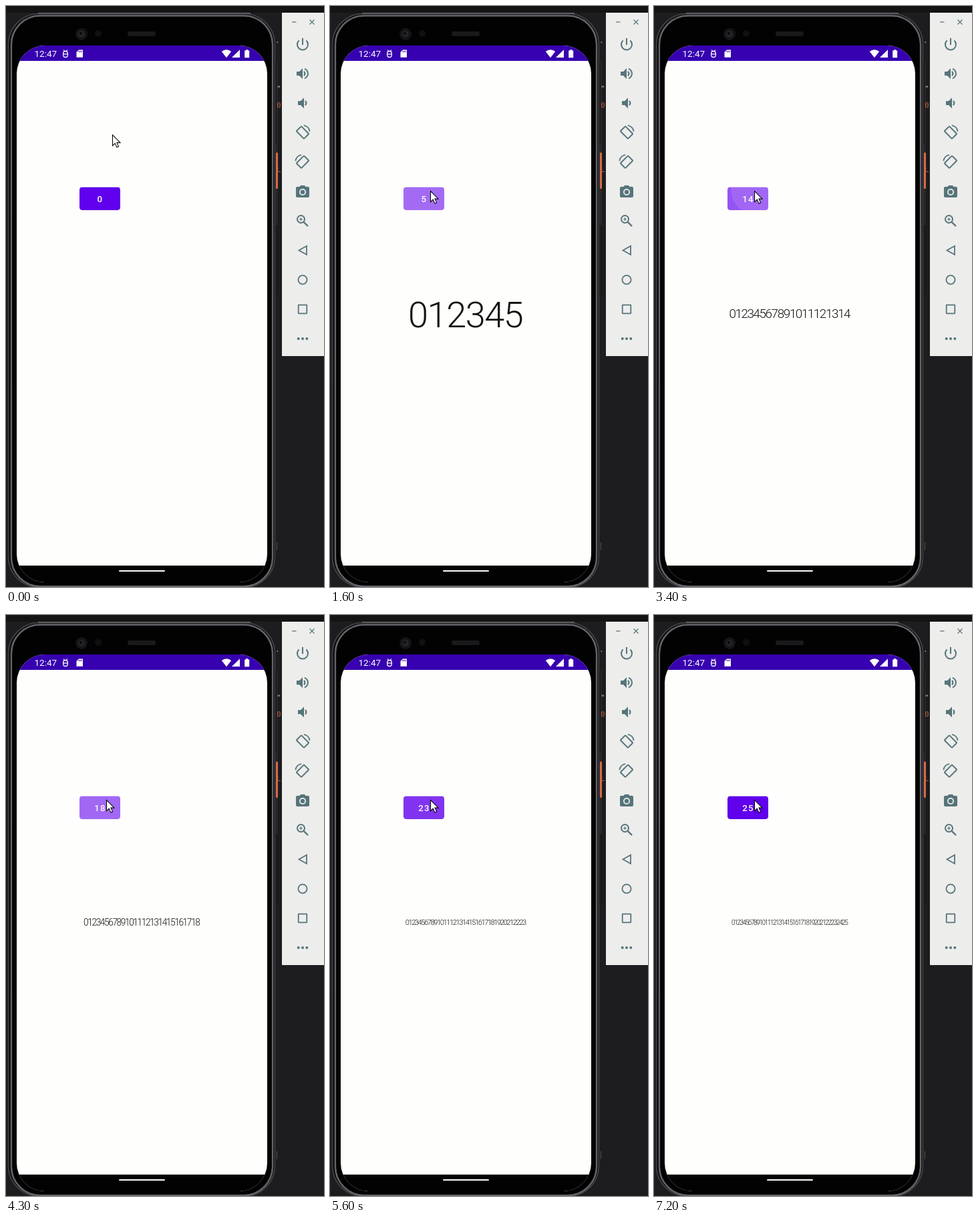
Recreate the animation shown at these times as an HTML page with a canvas. Size 476 by 868 pixels, loop 7.3 s.

```html
<!DOCTYPE html>
<html lang="en">
<head>
<meta charset="utf-8">
<title>Counter with shrinking text</title>
<style>
  html, body { margin: 0; width: 100%; height: 100%; overflow: hidden; background: #1d1d1f; }
  canvas { display: block; width: 476px; height: 868px; }
</style>
</head>
<body>
<canvas id="stage" width="476" height="868"></canvas>
<script>
const ctx = document.getElementById('stage').getContext('2d');
const LOOP = 7300, STEP = 100;
const DP = 375 / 393;                 // stage pixels per density-independent pixel
const WHITE = '#fefefc', PANEL = '#ededec', ICON = '#56757a', BAR = '#3700b0';
const TIP_START = [159, 192], TIP_END = [150, 276];

// Pace of the clicks: [count, time]
const PACE = [[1, 700], [5, 1530], [10, 2560], [14, 3360], [18, 4230], [23, 5250], [25, 6000]];
const clicks = [];
for (let n = 1; n <= 25; n++) {
  const i = Math.max(1, PACE.findIndex(p => p[0] >= n));
  const [n0, t0] = PACE[i - 1], [n1, t1] = PACE[i];
  clicks.push(t0 + (t1 - t0) * (n - n0) / (n1 - n0));
}

const clamp = v => Math.min(1, Math.max(0, v));
const ease = v => v * v * (3 - 2 * v);

function rect(x, y, w, h, color, r = 0) {
  ctx.fillStyle = color;
  ctx.beginPath();
  ctx.roundRect(x, y, w, h, r);
  ctx.fill();
}
function outline(x, y, w, h, r, color, width) {
  ctx.strokeStyle = color;
  ctx.lineWidth = width;
  ctx.beginPath();
  ctx.roundRect(x, y, w, h, r);
  ctx.stroke();
}
function disc(x, y, r, color) {
  ctx.fillStyle = color;
  ctx.beginPath();
  ctx.arc(x, y, r, 0, 7);
  ctx.fill();
}
function arc(x, y, r, from, to, width = 2) {
  ctx.lineWidth = width;
  ctx.beginPath();
  ctx.arc(x, y, r, from * Math.PI / 180, to * Math.PI / 180);
  ctx.stroke();
}
function fillPath(d, color) {
  ctx.fillStyle = color;
  ctx.fill(new Path2D(d));
}
function strokePath(d, width = 2) {
  ctx.lineWidth = width;
  ctx.stroke(new Path2D(d));
}
function text(str, x, y, font, color, spacing = 0) {
  ctx.font = font;
  ctx.letterSpacing = spacing + 'px';
  ctx.fillStyle = color;
  ctx.fillText(str, x, y);
}
function centered(str, x, y, font, color, spacing) {
  ctx.font = font;
  ctx.letterSpacing = spacing + 'px';
  text(str, x - ctx.measureText(str).width / 2, y, font, color, spacing);
}

function drawBackdrop() {
  rect(0, 0, 476, 868, '#1d1d1f');
  rect(0, 0, 476, 10, '#141415');
  const mono = '11px "DejaVu Sans Mono", monospace';
  text('.', 403, 55, mono, '#b8b8b8');
  text('"', 405, 127, mono, '#b8b8b8');
  text('0', 405, 152, mono, '#c0603c');
  text('L', 405, 248, mono, '#c0603c');
}

function drawPhone() {
  rect(403, 82, 3, 124, '#0a0a0b');
  rect(403, 328, 4, 105, '#0a0a0b');
  rect(405, 82, 1, 245, '#38383a');
  rect(405, 328, 1, 105, '#323234');
  rect(405, 801, 1, 12, '#505052');
  rect(404, 219, 3, 54, '#d86a4a', 1);

  rect(2, 10, 402, 860, '#0a0a0b', 48);
  outline(3.5, 11.5, 399, 857, 46, '#414145', 2);
  outline(8, 14.5, 391, 852.5, 43, '#64646a', 2.5);
  rect(9.5, 16, 388, 849.5, '#020203', 42);
  rect(48, 10, 318, 1.5, '#68686c');

  disc(113, 42, 9, '#151518');
  disc(113, 42, 5, '#242428');
  disc(112, 41, 2, '#0a0a0b');
  disc(138, 41, 5, '#101012');
  rect(182, 38, 42, 7, '#19191c', 3);
}

function drawStatusBar() {
  rect(16, 59, 375, 23, BAR);
  text('12:47', 42.5, 76, '13.5px Roboto, sans-serif', WHITE);

  outline(85.7, 67.5, 6.6, 9, 3.3, WHITE, 1.3);
  strokePath('M86 71.8h6M86.2 65.5l1.4 2M91.8 65.5l-1.4 2', 1.2);

  fillPath('M109 65.5h6v11.3h-9.5v-7.8z', WHITE);
  for (const x of [108.6, 110.6, 112.6]) rect(x, 67, 1, 2.2, BAR);

  fillPath('M330 77.3L322.8 68Q330 62.4 337.2 68z', WHITE);
  fillPath('M350 65.2v11.8h-12z', WHITE);
  fillPath('M357.2 66.5h2v-1.3h3v1.3h2v10.7h-7z', WHITE);
}

function drawButton(count, t) {
  ctx.save();
  ctx.beginPath();
  ctx.roundRect(110, 270.5, 61, 34.5, 4);
  ctx.clip();
  ctx.fillStyle = '#6000ec';
  ctx.fill();
  for (const start of clicks) {
    const age = t - start;
    if (age < 0 || age > 500) continue;
    const alpha = 0.27 * clamp(age / 100) * clamp((500 - age) / 200);
    const radius = 24 + 40 * ease(clamp(age / 120));
    disc(...TIP_END, radius, `rgba(255,255,255,${alpha})`);
  }
  ctx.restore();
  centered(String(count), 141, 293, `500 ${14 * DP}px Roboto, sans-serif`, WHITE, 1.25 * DP);
}

// The font shrinks by a tenth until the line fits half the screen.
function drawDigits(count) {
  if (!count) return;
  let str = '';
  for (let n = 0; n <= count; n++) str += n;
  const spacing = -1.5 * DP;
  const font = size => `300 ${size}px Roboto, sans-serif`;
  const width = size => {
    ctx.font = font(size);
    ctx.letterSpacing = spacing + 'px';
    return ctx.measureText(str).width;
  };
  let size = 96 * DP;
  while (width(size) > 187.5) size *= 0.9;
  centered(str, 202.7, 458.8 + 0.392 * size, font(size), '#121212', spacing);
}

function drawScreen(count, t) {
  ctx.save();
  ctx.beginPath();
  ctx.roundRect(16, 59, 375, 802, 42);
  ctx.clip();
  rect(16, 59, 375, 802, WHITE);
  drawStatusBar();
  rect(16, 836, 375, 30, '#020203');
  rect(169, 843, 69, 2, WHITE, 1);
  drawButton(count, t);
  drawDigits(count);
  ctx.restore();
}

function rotateIcon() {
  ctx.save();
  ctx.rotate(Math.PI / 4);
  outline(-8, -5.2, 16, 10.4, 1, ICON, 2);
  ctx.restore();
  arc(0, 0, 10.8, -80, -8, 1.8);
}

const SPEAKER = 'M-9-3v6h4l5 5v-16l-5 5z';
const toolIcons = [
  () => { arc(0, 0.5, 8, -48, 228); strokePath('M0-9v10'); },
  () => {
    fillPath(SPEAKER, ICON);
    arc(0, 0, 3.4, -60, 60, 2.2);
    arc(0, 0, 8, -68, 68);
  },
  () => {
    ctx.translate(2, 0);
    fillPath(SPEAKER, ICON);
    arc(0, 0, 3.4, -60, 60, 2.2);
  },
  rotateIcon,
  () => { ctx.scale(-1, 1); rotateIcon(); },
  () => {
    rect(-10, -7, 20, 16, ICON, 2);
    fillPath('M-5-6l2-3h6l2 3z', ICON);
    disc(0, 1, 5, PANEL);
    disc(0, 1, 3.2, ICON);
  },
  () => {
    arc(-2.5, -2.5, 5.5, 0, 360);
    strokePath('M1.8 1.8L8 8', 2.4);
    strokePath('M-5-2.5h5M-2.5-5v5', 1.2);
  },
  () => strokePath('M6-6.5v13l-11.5-6.5z', 1.8),
  () => arc(0, 0, 6.6, 0, 360, 1.8),
  () => outline(-6.3, -6.3, 12.6, 12.6, 0.5, ICON, 1.8),
  () => [-6.3, 0, 6.3].forEach(x => disc(x, 0, 2, ICON))
];

function drawToolbar() {
  rect(413, 10, 63, 513, PANEL);
  ctx.strokeStyle = ICON;
  strokePath('M428 24h6.5', 1.2);
  strokePath('M454.5 20.5l7 7m0-7l-7 7', 1.2);
  toolIcons.forEach((icon, i) => {
    ctx.save();
    ctx.translate(444, 57 + 44 * i);
    ctx.strokeStyle = ICON;
    icon();
    ctx.restore();
  });
}

function drawCursor(t) {
  const k = ease(clamp((t - 100) / 500));
  ctx.save();
  ctx.translate(...TIP_START.map((v, i) => v + (TIP_END[i] - v) * k));
  const arrow = new Path2D('M.5.5v16.2l3.8-3.6 2.6 6 2.7-1.2-2.6-5.8h5z');
  ctx.fillStyle = WHITE;
  ctx.fill(arrow);
  ctx.strokeStyle = '#080808';
  ctx.lineWidth = 1.1;
  ctx.stroke(arrow);
  ctx.restore();
}

function draw(now) {
  const t = Math.floor((now % LOOP) / STEP) * STEP;
  const count = clicks.filter(c => c <= t).length;
  drawBackdrop();
  drawPhone();
  drawScreen(count, t);
  drawToolbar();
  drawCursor(t);
}

const begin = performance.now();
function tick() {
  draw(performance.now() - begin);
  requestAnimationFrame(tick);
}
tick();
</script>
</body>
</html>
```
